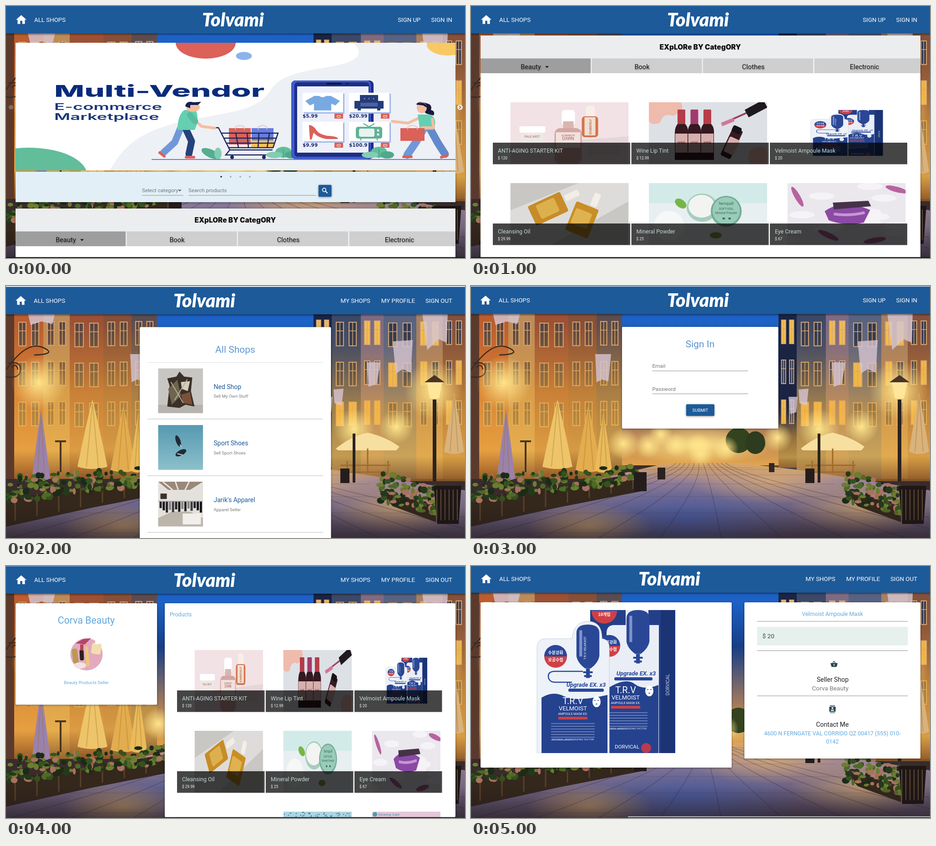
Recreate the animation shown at these times as an HTML page. Size 1009 by 555 pixels, loop 6 s.

```html
<!DOCTYPE html>
<html lang="en">
<head>
<meta charset="utf-8">
<title>Shop tour</title>
<style>
html, body { margin: 0; width: 100%; height: 100%; overflow: hidden; }
svg { display: block; }
#stage { width: 100vw; height: 100vh; }
text { font-family: Roboto, sans-serif; }
.logo { font: italic 900 41px Lato, sans-serif; }
.fat { font: 900 15.4px Inter, sans-serif; }
.wide { font-family: Inter, sans-serif; }
.price { font: bold 10.5px "DejaVu Sans", sans-serif; }
.ko { font-family: "Noto Sans CJK KR", "Noto Sans CJK", sans-serif; font-weight: bold; }
.card { filter: drop-shadow(0 1px 2px #0007); }
</style>
</head>
<body>
<svg id="stage" viewBox="0 0 1009 555" preserveAspectRatio="none"></svg>
<script>
const BLUE = '#1d5a99', SKY = '#62a8de', NAVY = '#1d2b70', RED = '#db6159', GREEN = '#62bd9b', SKIN = '#f5bda0';

const rect = (x, y, w, h, f, a = '') => `<rect x="${x}" y="${y}" width="${w}" height="${h}" fill="${f}" ${a}/>`;
const oval = (x, y, rx, ry, f, a = '') => `<ellipse cx="${x}" cy="${y}" rx="${rx}" ry="${ry}" fill="${f}" ${a}/>`;
const dot = (x, y, r, f, a) => oval(x, y, r, r, f, a);
const shape = (d, f, a = '') => `<path d="${d}" fill="${f}" ${a}/>`;
const line = (d, c, w = 1, a = '') => shape(d, 'none', `stroke="${c}" stroke-width="${w}" ${a}`);
const text = (s, x, y, size, f, a = '') => `<text x="${x}" y="${y}" font-size="${size}" fill="${f}" ${a}>${s}</text>`;
const mid = (s, x, y, size, f, a = '') => text(s, x, y, size, f, 'text-anchor="middle" ' + a);
const card = (x, y, w, h) => rect(x, y, w, h, '#fff', 'rx="2" class="card"');
const icon = (d, x, y, k, f) => shape(d, f, `transform="translate(${x} ${y}) scale(${k})"`);
const crop = (id, x, y, w, h, box) =>
  `<svg x="${x}" y="${y}" width="${w}" height="${h}" viewBox="${box}" preserveAspectRatio="none"><use href="#${id}"/></svg>`;
const each = (n, f) => Array.from({ length: n }, (_, i) => f(i)).join('');
const grad = (id, ...stops) => `<linearGradient id="${id}" x2="0" y2="1">` +
  stops.map(([o, c, a = 1]) => `<stop offset="${o}" stop-color="${c}" stop-opacity="${a}"/>`).join('') + '</linearGradient>';
const halo = (id, c, a) => `<radialGradient id="${id}"><stop stop-color="${c}" stop-opacity="${a}"/>` +
  `<stop offset="1" stop-color="${c}" stop-opacity="0"/></radialGradient>`;

let seed = 7;
const rnd = () => (seed = seed * 16807 % 2147483647) / 2147483647;
const pick = list => list[rnd() * list.length | 0];

// Evening street behind every page
function street() {
  const houses = [[0, 18, '#5b3a2c'], [18, 64, '#b9572f'], [82, 58, '#b98a5c'], [140, 74, '#964a34'], [214, 62, '#804838'],
    [276, 56, '#504552'], [676, 40, '#1b2442'], [716, 64, '#3a4768'], [780, 50, '#7d6a84'], [830, 72, '#566283'],
    [902, 58, '#a77f62'], [960, 49, '#84503c']];
  const lamp = (x, y, r) => dot(x, y, r, 'url(#lamp)');
  const brolly = (x, y, w, h, f) => shape(`M${x} ${y}q${w * .4} ${h * .35} ${w} ${h}q${-w} 10 ${-2 * w} 0q${w * .6} ${-h * .65} ${w} ${-h}`, f) +
    line(`M${x} ${y + 8}l${-w * .4} ${h - 8}M${x} ${y + 8}l${w * .4} ${h - 8}`, '#9a6a2055', 2);
  const leaf = (x, y) => oval(x, y, 3 + rnd() * 6, 3 + rnd() * 5, pick(['#24391c', '#35511f', '#4e6a26', '#1c2b18', '#6d7d30', '#a9715f']));
  return rect(0, 0, 1009, 555, '#3a2b2c') + rect(320, 0, 400, 395, 'url(#sky)') +
    houses.map(([x, w, f]) => rect(x, 0, w, 425, f) + each(w > 20 ? 6 : 0, i => {
      const wx = x + w * (i % 2 ? .58 : .14), wy = 66 + (i >> 1) * 88 + w * .2;
      return rect(wx, wy, w * .28, 54, '#d3a878') + rect(wx + 2, wy + 2, w * .28 - 4, 50, x < 676 ? '#4a3a42' : pick(['#2c3550', '#f4c04e'])) +
        line(`M${wx + w * .14} ${wy}v54M${wx} ${wy + 20}h${w * .28}`, '#d3a878', 1.5);
    })).join('') +
    rect(0, 0, 332, 425, 'url(#warm)') + rect(716, 60, 293, 370, 'url(#warm)') + rect(676, 250, 40, 150, 'url(#warm)') +
    rect(0, 60, 18, 365, '#5b3a2c') + line('M0 185Q45 120 80 135T62 152M0 200q30 5 32-15T5 170M12 180q10-12 14 4', '#3a2a20', 2.5) +
    ['M48 60h60l-6 24-24-6-24 8z', 'M273 150h35l-6 60-14-4-12 6z', 'M850 122l44-3-4 72-18-8-15 10z', 'M793 168h30l-8 48-18 6z',
      'M915 60h56l-2 65-18-8-25 24z', 'M720 228l22-2-4 38-16-6z', 'M698 244h20l-3 34-13 4z'].map(d => shape(d, '#d8c6d2', 'opacity=".8"')).join('') +
    oval(500, 350, 170, 45, 'url(#lamp)') + oval(588, 340, 28, 28, '#34431f') + oval(625, 345, 22, 25, '#2d3b1e') +
    shape('M430 390H590L720 405 1009 450V555H0V490Z', 'url(#stone)') + oval(470, 510, 260, 90, 'url(#cool)') +
    oval(660, 430, 180, 50, 'url(#shine)') + oval(860, 490, 160, 60, 'url(#shine)') + oval(260, 530, 140, 50, 'url(#shine)') +
    each(12, i => line(`M${450 + i * 10} 390Q${430 + i * 16} 430 ${-260 + i * 135} 555`, '#2a203555', 1.5)) +
    each(7, i => line(`M${410 - i * 55} ${400 + i * i * 4}H${620 + i * 60}`, '#2a203533')) +
    [[72, 213, 60], [335, 347, 35], [417, 327, 26], [390, 352, 28], [450, 350, 26], [500, 350, 26], [560, 358, 28], [674, 334, 32],
      [765, 315, 45], [858, 310, 38], [940, 230, 65], [505, 370, 28]].map(p => lamp(...p)).join('') +
    brolly(77, 272, 20, 152, '#9a82ac') + brolly(190, 250, 33, 148, '#edc469') + brolly(258, 265, 28, 140, '#e3ad4f') +
    brolly(291, 280, 19, 126, '#eabb5b') + brolly(985, 235, 22, 130, '#d9b27c') +
    line('M120 340v70M108 342h24', '#4a3522', 4) +
    shape('M725 358Q760 330 795 323 835 332 865 354L858 362H730Z', '#f7dfa0') + line('M795 358v55M735 395h110M740 410h100M750 385v30M840 385v30', '#a06a2a', 3) +
    line('M765 325v108', '#2b221f', 6) + line('M942 250v180', '#2b221f', 8) + shape('M925 212h34l-7 36h-20z', '#ffe69a') + shape('M920 212l22-16 22 16z', '#493428') +
    shape('M0 470L385 410V450L190 488 0 530Z', '#34271c') + each(8, i => line(`M${20 + i * 48} ${465 - i * 7}v${52 - i * 3}`, '#5a4228', 3)) +
    each(190, () => { const x = rnd() * 365; return leaf(x, 450 - x * .1 + (rnd() - .5) * (58 - x * .06)); }) +
    rect(358, 410, 28, 42, '#241d1c') + rect(410, 400, 17, 26, '#2b211e') + rect(735, 402, 20, 32, '#241d1c') + rect(655, 390, 12, 20, '#332722') +
    shape('M820 450L945 480V520L850 485Z', '#34271c') +
    each(100, () => { const x = 822 + rnd() * 125; return leaf(x, 442 + (x - 820) * .22 + (rnd() - .5) * 65); }) +
    shape('M940 440h61l-6 84h-47z', '#1f1715') + each(6, i => line(`M${947 + i * 9} 448v68`, '#5e4a38', 2)) + rect(0, 485, 1009, 70, 'url(#dusk)');
}

function maskPack() {
  const bottle = (x, y, k) => `<g transform="translate(${x} ${y}) scale(${k})">` +
    shape('M-24 18Q-24 0 0 0T24 18V66Q22 80 6 92H-6Q-22 80-24 66Z', '#2a4796') + rect(-18, 12, 6, 55, '#7d93cb') +
    rect(-4, 92, 8, 20, '#2a4796') + line('M-10 100H10M-8 108H8', '#2a4796', 4) + '</g>';
  const badge = (x, y, r, a, b) => dot(x, y, r, '#cf4046') + shape(`M${x - r} ${y}a${r} ${r} 0 0 1 ${2 * r} 0z`, '#27479b') +
    mid(a, x, y - 5, 9, '#fff', 'class="ko"') + mid(b, x, y + 11, 9, '#fff', 'class="ko"');
  const front = (x, y) => mid('T.R.V', x, y, 20, '#fff') + mid('VELMOIST', x, y + 14, 13, '#fff') + mid('AMPOULE MASK EX.', x, y + 24, 7, '#fff') +
    rect(x - 32, y + 28, 64, 6, '#cf4046') + each(7, i => line(`M${x - 48} ${y + 43 + i * 6}h${i == 6 ? 50 : 96}`, '#a9b7dc', 1.2)) +
    oval(x + 52, y - 5, 9, 12, '#fff') + line(`M${x + 47} ${y - 8}h3m4 0h3m-7 8h4`, '#27479b', 1.5) +
    mid('NATURAL MOISTURIZING FACTOR', x, y + 80, 6, '#dfe6f8');
  return rect(262, 97, 187, 315, '#233f89') + rect(417, 97, 32, 315, '#1b3475') +
    shape('M298 148Q298 130 315 130H340V97H390V130H413V412H298Z', '#e9edf6') + bottle(367, 97, 1.05) +
    badge(293, 99, 28, '', '10개입') + badge(304, 176, 24, '수분강화', '모공수렴') +
    shape('M303 268Q340 245 360 260T412 262V412H303Z', '#25428f') + mid('Upgrade EX. x3', 363, 241, 13, '#27479b', 'font-style="italic" font-weight="700"') +
    rect(315, 245, 84, 7, '#27479b', 'rx="3"') + front(340, 280) + text('DORVICAL', 316, 402, 11.5, '#fff') + dot(385, 401, 11, '#b83b4f') +
    text('DORVICAL', 0, 0, 10, '#c9d4ef', 'transform="translate(436 285) rotate(-90)"') +
    shape('M145 412V178Q146 160 164 160H222Q226 122 257 122T288 160Q304 162 304 180V412Z', '#edf1f8', 'stroke="#c8d0e2"') +
    bottle(257, 129, 1.05) + line('M246 232H183Q169 233 170 244T184 256H222', '#27479b', 2.5) + badge(186, 199, 25, '수분강화', '모공수렴') +
    text('T.R.V VELMOIST', 0, 0, 7, '#fff', 'transform="translate(253 206) rotate(-90)"') +
    mid('Upgrade EX. x3', 253, 266, 13, '#27479b', 'font-style="italic" font-weight="700"') + rect(214, 270, 78, 7, '#27479b', 'rx="3"') +
    shape('M155 290Q180 274 205 287T300 284V412H155Z', '#25428f') + front(224, 304);
}

const pill = (x, y, w, h, f, turn) => rect(x, y, w, h, f, `rx="4" transform="rotate(${turn} ${x + w / 2} ${y + h / 2})"`);
const goods = [
  () => rect(0, 0, 260, 136, '#f2e2e5') + shape('M0 95L260 75V136H0Z', '#e5d6da') +
    rect(22, 62, 52, 29, '#eee8e5', 'rx="4"') + rect(20, 53, 57, 14, '#fff', 'rx="3"') + mid('PALE MIST', 48, 78, 7, '#a66') +
    rect(113, 17, 29, 34, '#fff', 'rx="7"') + rect(116, 42, 23, 18, '#d9b5b0') + rect(97, 57, 60, 79, '#d3a7a2', 'rx="13"') +
    rect(100, 66, 54, 34, '#f0e2df') + mid('DAWN', 127, 83, 9, '#a55') + mid('ALDERMOTH', 127, 75, 5, '#a55') +
    rect(166, 8, 20, 25, '#f8efeb', 'rx="5"') + rect(157, 31, 36, 46, '#d4744c', 'rx="7"') + rect(163, 33, 24, 40, '#f2dfd2') +
    text('EMBERLY', 0, 0, 8, '#a54', 'transform="translate(178 71) rotate(-90)"') + rect(169, 93, 72, 22, '#dfcfcf', 'rx="3"'),
  () => rect(0, 0, 260, 136, '#dde0e5') + shape('M0 0H70Q82 18 54 30 30 22 25 45 8 52 0 42Z', '#efbbad') + dot(242, 122, 24, '#e9b9b0') +
    each(3, i => rect(63 + i * 28.5, 16, 17, 36, ['#b33a48', '#a23a6d', '#b73d48'][i], 'rx="2"') +
      shape(`M${63 + i * 28.5} 48h17q7 7 6 20v59h-29v-59q0-13 6-20`, '#351820') + rect(58 + i * 28.5, 69, 27, 42, '#d7b0ae') +
      mid('WINE', 71.5 + i * 28.5, 91, 7, '#733')) +
    line('M160 48L218 22', '#9a4061', 4) + line('M160 49l27-11', '#d0789a', 8) + line('M215 25L256 3', '#1d191d', 19) +
    pill(170, 56, 24, 68, '#371b23', 25) + pill(170, 78, 24, 36, '#d7b0ae', 25) + pill(183, 53, 20, 15, '#171317', 25),
  () => rect(0, 0, 260, 136, '#fff') + crop('mask', 48.4, 17, 162, 101, '140 97 310 315'),
  () => rect(0, 0, 260, 136, '#c9c7c4') + shape('M0 60L150 0H260V40L90 136H0Z', '#dedcda') +
    pill(44, 33, 78, 47, '#c78c28', -25) + pill(60, 39, 44, 33, '#ddb04e', -25) + pill(119, 20, 33, 14, '#f2eee6', -25) +
    pill(131, 47, 53, 68, '#c98e24', 22) + pill(137, 60, 38, 36, '#dfb251', 22) + pill(180, 22, 15, 30, '#f3efe6', 22),
  () => rect(0, 0, 260, 136, '#e8eff0') + rect(0, 0, 260, 44, '#d3ebe8') + dot(44, 94, 33, '#f6f8f8') +
    oval(70, 45, 14, 9, '#78b548', 'transform="rotate(35 70 45)"') + oval(117, 54, 34, 31, '#a7cdbd') + oval(116, 51, 29, 25, '#f3f4f2') +
    dot(170, 62, 34, '#74ad98') + dot(170, 61, 30, '#9bcbb9') + mid('fernquill', 170, 48, 9, '#376e5b') +
    mid('SOFT-VEIL', 170, 59, 7, '#376e5b') + mid('Mineral Powder', 170, 68, 7, '#376e5b') + line('M162 78h5m8 0h5', '#376e5b', 4) + oval(147, 115, 13, 7, '#8da14c'),
  () => rect(0, 0, 260, 136, '#eae7ed') + each(14, () => oval(rnd() * 260, rnd() * 136, 28, 8, '#f5f3f7')) +
    shape('M82 62Q120 34 182 59L168 87Q130 96 91 82Z', '#8b4aa4') + shape('M100 43L178 39 184 51 102 58Z', '#453248') +
    line('M102 68Q135 73 170 65', '#c696d5', 6) + [[22, 30, 60], [240, 14, 15], [90, 115, 25], [192, 126, -10]].map(([x, y, a]) =>
      oval(x, y, 25, 6, '#b763a0', `transform="rotate(${a} ${x} ${y})"`)).join('')
];
const labels = [['ANTI-AGING STARTER KIT', '120'], ['Wine Lip Tint', '12.99'], ['Velmoist Ampoule Mask', '20'],
  ['Cleansing Oil', '29.99'], ['Mineral Powder', '25'], ['Eye Cream', '67']];

const tiles = (x0, y0, step, w) => labels.map(([name, cost], i) => {
  const x = x0 + i % 3 * step, y = y0 + (i > 2) * 178;
  return crop('p' + i, x + 38.5, y, w - 42, 136, '0 0 260 136') + rect(x, y + 89, w, 47.5, '#000', 'opacity=".73"') +
    text(name, x + 11, y + 111, 12.3, '#c3d9d6') + text('$ ' + cost, x + 11, y + 126, 8.4, '#f4f4f4');
}).join('');

function bar(y, user, x = 0) {
  const top = y - 30, item = (s, end) => text(s, end, y + 4.7, 13.3, '#fff', 'text-anchor="end"');
  return rect(0, 0, 1009, 4, '#e6ecf2') + rect(0, top, 1009, 60.5, BLUE) + rect(0, top + 60.5, 1009, 5, 'url(#shade)') +
    icon('M10 20v-6h4v6h5v-8h3L12 3 2 12h3v8z', 19.7 + x, y - 13.5, 1.15, '#fff') +
    text('ALL SHOPS', 62 + x, y + 4.7, 13.3, '#fff') + mid('Tolvami', user ? 436 : 499, y + 15, 41, '#fff', 'class="logo"') +
    (user ? item('MY SHOPS', 801) + item('MY PROFILE', 899) : item('SIGN UP', 911.5)) + item(user ? 'SIGN OUT' : 'SIGN IN', 981);
}

function banner() {
  const ware = (x, y, cost, art) => rect(x + 3, y + 2, 89, 44, '#a3b9ea') + rect(x, y, 89, 43, '#fff') +
    `<g transform="translate(${x + 44} ${y + 22})">${art}</g>` + text('$' + cost, x, y + 55, 10.5, NAVY, 'class="price"') +
    rect(x + 70, y + 46, 19, 11, RED, 'rx="1"') + line(`M${x + 76} ${y + 54}v-4h7v4z`, '#fff');
  const limb = (d, c, w) => line(d, c, w, 'stroke-linecap="round" stroke-linejoin="round"');
  const bag = (x, y, w, h, f) => rect(x, y, w, h, f) + line(`M${x + w * .3} ${y + 4}v-6q${w * .2}-8 ${w * .4} 0v6`, '#e8b9b5', 1.5);
  const bush = (x, y) => oval(x, y, 18, 12, GREEN) + oval(x - 20, y + 6, 18, 7, '#82cdb2') + oval(x + 18, y + 6, 15, 8, '#4fa98a') + limb(`M${x} ${y - 6}v18`, '#3a8b72', 1);
  return '<svg x="21" y="81" width="967" height="281" viewBox="21 81 967 281">' + rect(21, 81, 967, 281, '#fff') +
    shape('M764 81Q795 112 742 127C690 142 610 140 582 185S500 232 400 252 260 305 228 362H988V81Z', '#edf0f5') +
    oval(439, 81, 66, 35, RED) + oval(523, 110, 17.5, 9, '#8bb4e9') + oval(972, 85, 47, 24, '#f8c863') + oval(50, 372, 128, 60, GREEN) +
    '<g transform="translate(106 0) scale(1.95 1)">' + text('Multi-Vendor', 0, 200, 36, '#082b7c', 'class="wide" font-weight="800"') +
    text('E-commerce', 0, 229, 19.6, '#193579', 'class="wide" font-weight="600"') + text('Marketplace', 0, 251, 19.6, '#193579', 'class="wide" font-weight="600"') + '</g>' +
    bush(610, 322) + rect(627, 164, 181, 173, '#1d2f83', 'rx="9"') + rect(627, 164, 175, 173, '#3e5bd0', 'rx="9"') + rect(634, 168, 165, 164, '#1d2f83', 'rx="7"') +
    rect(640, 177, 157, 146, '#edf0fa') + rect(704, 169, 34, 4, '#0c1646', 'rx="2"') + dot(750, 171, 2, '#0c1646') +
    ware(652, 191, '5.99', shape('M-18-15H-8Q0-9 8-15H18L38-4 28 6 19 2V17H-19V2L-28 6-38-4Z', '#79a9e2')) +
    ware(754, 191, '20.99', shape('M-20-17H20V-4H32V13H25V17H18V13H-18V17H-25V13H-32V-4H-20Z', '#243c79') + rect(-19, 0, 38, 8, '#4a63a0') + each(3, i => dot(-10 + i * 10, -9, 1.5, '#7f93c6'))) +
    ware(652, 255, '9.99', shape('M-30-15Q-20-14-14-4T12 9Q34 10 34 16H8Q-10 13-20 2L-24 17H-28Z', RED)) +
    ware(754, 255, '100.9', rect(-29, -11, 58, 26, '#5fb394', 'rx="5"') + rect(-22, -7, 34, 18, '#e8f4ef', 'rx="4"') + dot(20, -3, 2.5, '#fff') + dot(20, 6, 2.5, '#fff') + line('M-12-18L0-11 12-18M-18 15v4M18 15v4', '#5fb394', 2.5)) +
    bush(820, 322) + oval(450, 325, 22, 9, '#55ae90', 'transform="rotate(25 450 325)"') + oval(466, 325, 8, 13, '#82cdb2') +
    bag(490, 269, 48, 36, RED) + bag(540, 269, 48, 30, '#667de0') + rect(539, 296, 50, 16, '#f4c259') +
    line('M458 268h9l25 49h94M474 280H598L587 312H488M480 291H594M484 302H590M505 280l6 32M530 280l3 32M556 280l-2 32M579 280l-5 32M492 317l-9 11H572', '#1d275d', 2.5) +
    dot(497, 333, 4, '#1d275d') + dot(567, 333, 4, '#1d275d') +
    line('M320 338H988', '#5f7fd0', 2) +
    limb('M384 268L371 300 346 323', '#7098d8', 15) + limb('M394 268L408 298 402 326', '#24427c', 15) + limb('M338 323l10 8', RED, 6) + limb('M396 333h17', RED, 6) +
    shape('M392 229H417Q426 248 415 273H377Q377 240 392 229Z', '#65cfb1') + oval(411, 223, 15, 10, SKIN) +
    shape('M394 221Q396 208 412 212L429 211 422 218H405V225Z', '#17204e') + limb('M407 245L430 265 459 269', SKIN, 6) + limb('M404 240l12 14', '#58bca0', 13) +
    limb('M918 270L901 300 882 328', '#7098d8', 17) + limb('M932 270L949 301 965 326', '#6289cc', 17) + limb('M874 332h17M957 333l13-4', RED, 6) +
    limb('M909 246L884 258 849 254', SKIN, 6) + shape('M905 239H934Q950 252 939 273H910Z', '#65cfb1') + limb('M937 249L940 268 914 268', SKIN, 6) +
    shape('M902 216Q908 208 924 214 938 217 934 229 944 231 940 241L924 237Z', '#1a183b') + oval(914, 224, 11, 12, SKIN) + shape('M902 217Q920 206 927 225L917 219Z', '#1a183b') +
    bag(867, 269, 53, 28, RED) + '</svg>';
}

function categories(dy) {
  const tab = (x, w, cx, s, f) => rect(x, 496.5, w, 32.5, f) + mid(s, cx, 520, 14.6, '#161616', 'style="text-shadow:1px 2px 3px #0004"');
  return `<g transform="translate(0 ${dy})">` + rect(21, 446, 967, 490, '#fff', 'class="card"') + rect(21, 446, 967, 83, '#ecedef') +
    mid('EXpLORe BY CategORY', 504, 477, 15.4, '#111', 'class="fat" textAnchor=""') +
    tab(21, 242, 131.5, 'Beauty', '#9e9e9e') + shape('M163 513.5h8l-4 4z', '#111') + tab(265.5, 242, 376, 'Book', '#cfcfcf') +
    tab(510, 242, 620.5, 'Clothes', '#cfcfcf') + tab(755, 233, 865, 'Electronic', '#cfcfcf') + '</g>';
}

const floor = rect(0, 553, 1009, 2, '#17191d');
const rule = (x, y, w, c = '#8d8d8d') => line(`M${x} ${y}h${w}`, c);

const home = () => banner() + dot(998, 223, 6, '#fff', 'opacity=".8"') + line('M996.5 220l3 3-3 3', '#664', 1.5) +
  dot(11, 223, 5, '#fff', 'opacity=".25"') + rect(21, 365, 967, 67, '#e3eff7', 'class="card"') + each(4, i => dot(473 + i * 21, 376, 1.8, i ? '#9ba5ae' : '#16202a')) +
  text('Select category', 299, 410, 11.6, '#6c7680') + shape('M378 404.5h8l-4 4z', '#5c666e') + rule(299, 417, 91) +
  text('Search products', 401, 410, 11.6, '#6c7680') + rule(401, 417, 280) + rect(687, 394, 28.5, 26, BLUE, 'rx="2" class="card"') +
  dot(699.5, 405, 3.8, 'none', 'stroke="#fff" stroke-width="1.7"') + line('M702.5 408l4.2 4.2', '#fff', 2) + categories(0) + floor + bar(30, 0);

const listing = () => categories(-381) + tiles(48, 212, 304.5, 302) + floor + bar(30, 0);

function shops() {
  const photos = [
    rect(0, 0, 98.5, 98.5, '#c8c6c3') + rect(0, 80, 98.5, 18.5, '#b7b3ae') + shape('M20 84L25 38 20 22 40 18 47 7 57 18 75 20 72 50 80 84 60 80 47 87Z', '#3a3029') +
      shape('M22 45L42 25 50 60 30 80Z', '#6e6550') + shape('M50 30L70 28 65 50 52 45Z', '#d5cdb8') + shape('M50 58l20-6 5 28-20-4z', '#7a5138') + line('M28 30L55 76M64 24L36 70', '#b8ae96', 2),
    rect(0, 0, 98.5, 98.5, 'url(#teal)') + oval(44, 35, 5, 13, '#202c38', 'transform="rotate(-20 44 35)"') + oval(50, 61, 13, 6, '#202c38', 'transform="rotate(-28 50 61)"') + line('M48 43l3 6M42 63l12 3', '#c4d5df', 2),
    rect(0, 0, 98.5, 98.5, '#e4e1dc') + shape('M0 0H98.5L70 18H22Z', '#9a8879') + line('M10 0l22 18M38 0l6 18M68 0l-9 18', '#e8e2da', 3) + shape('M0 80L30 66H70L98.5 80V98.5H0Z', '#bcb5ab') +
      rule(0, 43, 98, '#777') + each(14, i => rect(3 + i * 6.8, 44, 5, 14 + i * 5 % 11, pick(['#25252b', '#3c3c42', '#8b8480', '#16161a']))) + rect(5, 26, 14, 12, '#3a302c') + rect(54, 70, 40, 24, '#f1efec')];
  const rows = [['Ned Shop', 'Sell My Own Stuff'], ['Sport Shoes', 'Sell Sport Shoes'], ["Jarik's Apparel", 'Apparel Seller']];
  return card(294, 90.5, 420.5, 480) + mid('All Shops', 504, 146.5, 21, '#5b9ad3') + rule(311, 168.5, 386, '#ddd') + rows.map(([name, note], i) => {
    const y = i * 124.8;
    return `<g transform="translate(334.5 ${181.5 + y})">${photos[i]}</g>` + text(name, 456.5, 226.5 + y, 14, BLUE) +
      text(note, 456.5, 246 + y, 9.7, '#7b7b7b') + rule(311, 293 + y, 386, '#bbb');
  }).join('') + bar(32, 1, -1);
}

const signIn = () => card(332, 90, 343.5, 224) + mid('Sign In', 503.5, 135, 21, '#5c93cf') + text('Email', 398.5, 180, 11.6, '#757575') +
  rule(398.5, 187, 210.5) + text('Password', 398.5, 230.5, 11.6, '#757575') + rule(398.5, 237.5, 210.5) +
  rect(473, 260.5, 62, 25.5, BLUE, 'rx="2" class="card"') + mid('SUBMIT', 504, 276.5, 9.7, '#fff') + bar(31.2, 0, -1.5);

const seller = () => card(21, 82, 311, 223.5) + mid('Corva Beauty', 176.5, 127, 21.3, SKY) + dot(177, 194.5, 35.5, '#e3a9bf') +
  shape('M153 170l16-9 18-2-14 14z', '#b5456f') + pill(146, 182, 12, 32, '#b89a55', -8) + pill(162, 184, 9, 24, '#2b2023', -3) + rect(163, 173, 7, 13, '#b94252') +
  pill(175, 177, 7, 44, '#e7cb75', -5) + pill(188, 170, 21, 24, '#f1dfb0', 8) + rect(196, 165, 8, 7, '#fff') + oval(163, 219, 13, 7, '#f4e2e0') +
  mid('Beauty Products Seller', 176.5, 260, 9.8, SKY) + card(349, 82, 639, 471) + text('Products', 360, 111, 12, SKY) + tiles(376, 185, 195, 192.5) +
  rect(610, 541, 150, 12, '#aed5e2') + each(40, () => dot(612 + rnd() * 146, 542 + rnd() * 10, 1.3, '#3f8fb4')) +
  rect(805, 541, 150, 12, '#e4c7d8') + dot(811, 547, 5, '#4a9cae') + text('Glowing Care', 818, 550, 8, '#4a8fa5') + bar(30.5, 1);

const detail = () => card(21, 80, 552, 364) + crop('mask', 140, 97, 310, 315, '140 97 310 315') + card(601, 80, 387, 344) +
  mid('Velmoist Ampoule Mask', 794.5, 110, 12.4, SKY) + rule(629, 122, 331) + rect(629, 134, 331, 41, '#e6f0ec') + text('$ 20', 640.5, 159, 13.7, '#3e4a4a') +
  rule(629, 186.5, 331) + icon('M17.2 9l-4.4-6.6a1 1 0 0 0-1.6 0L6.8 9H2a1 1 0 0 0-1 1.3l2.6 9.2A2 2 0 0 0 5.5 21h13a2 2 0 0 0 1.9-1.5L23 10.3A1 1 0 0 0 22 9zM9 9l3-4.4L15 9zM12 17a2 2 0 1 1 0-4 2 2 0 0 1 0 4z', 789.7, 207.5, .7, '#294653') +
  text('Seller Shop', 830, 254.5, 14, '#222', 'text-anchor="end"') + text('Corva Beauty', 830, 274, 13.7, '#777', 'text-anchor="end"') + rule(629, 286, 331) +
  icon('M4 0h16v2H4zM4 22h16v2H4zM20 4H4a2 2 0 0 0-2 2v12c0 1.1.9 2 2 2h16a2 2 0 0 0 2-2V6a2 2 0 0 0-2-2z', 786.2, 307, .7, '#294653') + dot(794.6, 313, 2, '#fff') + rect(791, 316.5, 7, 2.5, '#fff', 'rx="1"') +
  mid('Contact Me', 794.5, 354, 14, '#222') + mid('4600 N FERNGATE VAL CORRIDO QZ 00417 (555) 010-', 794.5, 373, 12.4, SKY) +
  mid('0142', 794.5, 391, 12.4, SKY) + rect(345, 551.5, 664, 1.5, '#e3e3e3') + bar(28.3, 1);

const defs = grad('sky', [0, '#1a56b4'], [.2, '#1d62c8'], [.45, '#173e86'], [.8, '#b08058'], [1, '#e0a14c']) +
  grad('warm', [0, '#d98a30', 0], [.2, '#e09a35', .1], [.55, '#f3ad3a', .55], [.85, '#f7bb48', .72], [1, '#8f5a24', .8]) +
  grad('stone', [0, '#d7a565'], [.25, '#9a8296'], [.6, '#6e6280'], [1, '#514456']) + grad('dusk', [0, '#1a1218', 0], [1, '#1a1218', .45]) +
  grad('teal', [0, '#5699b1'], [1, '#8cc0cb']) + grad('shade', [0, '#000', .4], [1, '#000', 0]) +
  halo('lamp', '#ffe48a', 1) + halo('cool', '#4059a8', .75) + halo('shine', '#f2bb62', .55) +
  `<g id="mask">${maskPack()}</g>` + goods.map((draw, i) => `<g id="p${i}">${draw()}</g>`).join('');

const stage = document.getElementById('stage');
stage.innerHTML = `<defs>${defs}</defs>` + street() +
  [home, listing, shops, signIn, seller, detail].map(page => `<g class="page">${page()}</g>`).join('');

const pages = [...stage.querySelectorAll('.page')], start = performance.now();
function tick() {
  const now = Math.floor((performance.now() - start) / 1000) % pages.length;
  pages.forEach((p, i) => p.style.display = i === now ? '' : 'none');
  requestAnimationFrame(tick);
}
tick();
</script>
</body>
</html>
```
